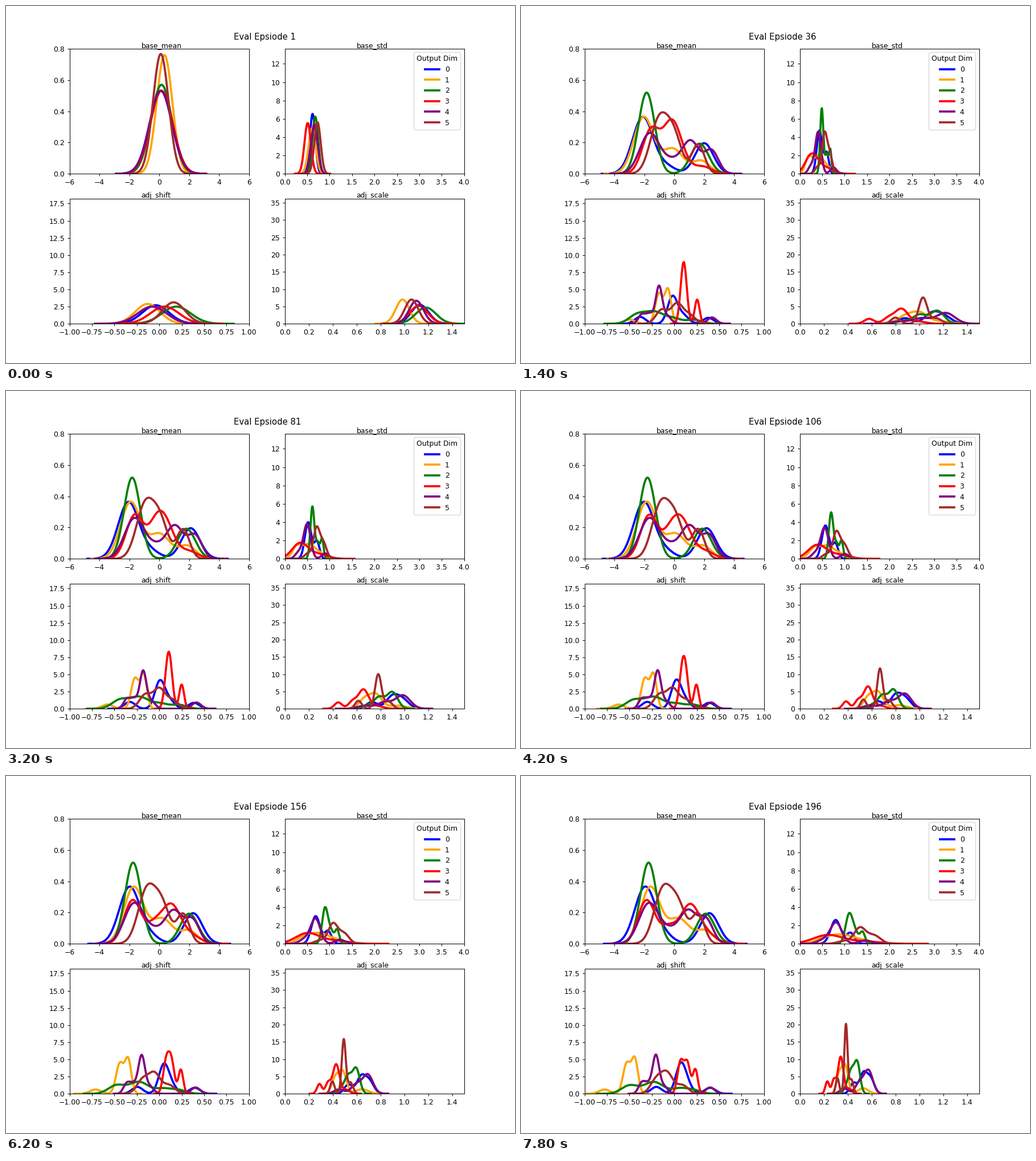
Write a matplotlib script that moves like this. It is 894 by 626 pixels and loops after 8000 ms.

```python
import numpy as np
import matplotlib.pyplot as plt
from matplotlib.animation import FuncAnimation

W, H, DPI = 894, 626, 89.4
FRAMES, INTERVAL = 40, 200
OPEN = 7      # frames in which the first single hump splits up
REACH = 4     # widths drawn on either side of a hump
COLORS = ["blue", "orange", "green", "red", "purple", "brown"]

plt.rcParams["font.family"] = "DejaVu Sans"
fig = plt.figure(figsize=((W + .01) / DPI, (H + .01) / DPI), dpi=DPI)
curves = []


class Hump:
    """One Gaussian: leaves the start hump, then drifts from a to b.

    With ratio set it drifts geometrically and its width follows its centre.
    """

    def __init__(self, start, ratio, a, b, width, weight):
        self.start, self.ratio = start, ratio
        self.a, self.b, self.width, self.weight = a, b, width, weight

    def place(self, t):
        if t < OPEN:
            u = t / OPEN
            c0, s0 = self.start
            s1 = self.width * (self.a if self.ratio else 1)
            return c0 + (self.a - c0) * u, s0 * (s1 / s0) ** u
        u = (t - OPEN) / (FRAMES - 1 - OPEN)
        if self.ratio:
            c = self.a * (self.b / self.a) ** u
            return c, self.width * c
        return self.a + (self.b - self.a) * u, self.width


def panel(pos, name, name_x, xlim, top, xstep, ystep):
    ax = fig.add_subplot(2, 2, pos)
    ax.set(xlim=xlim, ylim=(0, top))
    ax.set_xticks(np.arange(xlim[0], xlim[1] + 1e-9, xstep))
    ax.set_yticks(np.arange(0, top + 1e-9, ystep))
    ax.text(name_x, top * 1.0115, name)
    ax.set_prop_cycle(color=COLORS)
    return ax


def curve(ax, start, *humps, ratio=False):
    """start: centre and width; humps: from, to, width, weight."""
    line, = ax.plot([], [], lw=3, label=str(len(ax.lines)))
    curves.append((line, [Hump(start, ratio, *h) for h in humps]))


def density(humps, t):
    spots = [h.place(t) for h in humps]
    total = sum(h.weight for h in humps)
    x = np.linspace(min(c - REACH * s for c, s in spots),
                    max(c + REACH * s for c, s in spots), 500)
    y = sum(h.weight / s * np.exp(-((x - c) / s) ** 2 / 2)
            for h, (c, s) in zip(humps, spots))
    return x, y / (total * np.sqrt(2 * np.pi))


mean = panel(1, "base_mean", -1.2, (-6, 6), .8, 2, .2)
std = panel(2, "base_std", 1.6, (0, 4), 13.64, .5, 2)
shift = panel(3, "adj_shift", -.2, (-1, 1), 18.2, .25, 2.5)
scale = panel(4, "adj_scale", .6, (0, 1.5), 36.15, .2, 5)
title = mean.text(5, .86, "", fontsize=12)

curve(mean, (.1, .75), (-2.1, -1.95, .69, .66), (-.5, -.6, .6, .07),
      (2, 2.35, .62, .32))
curve(mean, (.35, .525), (-2.05, -1.6, .66, .6), (-.1, .3, .7, .28),
      (1.8, 2.05, .58, .12))
curve(mean, (.15, .7), (-1.85, -1.72, .545, .71), (1.7, 2.1, .6, .29))
curve(mean, (.15, .75), (-1.55, -1.85, .58, .41), (-.3, -.4, .5, .12),
      (0, 1.05, .65, .41), (1.9, 2.3, .6, .07))
curve(mean, (.1, .75), (-1.65, -1.7, .66, .41), (-.2, -.3, .6, .1),
      (1.1, .95, .58, .29), (2.5, 2.15, .46, .16))
curve(mean, (.1, .52), (-1, -.75, .6, .5), (0, .3, .52, .27),
      (1.6, 1.6, .42, .19))

curve(std, (.62, .061), (.44, .8, .14, .73), (.6, 1.13, .08, .27), ratio=True)
curve(std, (.61, .08), (.2, .6, .38, .35), (.42, 1, .24, .5),
      (.62, 1.45, .14, .15), ratio=True)
curve(std, (.68, .064), (.49, 1.1, .072, .65), (.6, 1.24, .06, .2),
      (.68, 1.4, .04, .18), ratio=True)
curve(std, (.51, .072), (.27, .62, .52, .76), (.6, 1.4, .26, .24), ratio=True)
curve(std, (.66, .074), (.41, .81, .16, .75), (.25, .52, .25, .13),
      (.75, 1.46, .09, .12), ratio=True)
curve(std, (.73, .071), (.55, 1.34, .095, .55), (.66, 1.65, .09, .35),
      (.4, 1, .15, .12), ratio=True)

curve(shift, (-.04, .148), (-.02, .07, .055, .54), (-.38, -.2, .06, .15),
      (.1, .14, .06, .18), (.38, .4, .06, .13))
curve(shift, (-.13, .138), (-.17, -.53, .042, .45), (-.07, -.44, .036, .43),
      (-.5, -.78, .06, .09))
curve(shift, (.19, .16), (-.42, -.5, .09, .27), (-.22, -.23, .11, .48),
      (0, .05, .08, .13), (.22, .2, .09, .13))
curve(shift, (.06, .16), (.1, .07, .034, .4), (.11, .145, .033, .37),
      (.255, .235, .027, .24))
curve(shift, (-.08, .16), (-.17, -.205, .036, .5), (-.28, -.3, .05, .2),
      (-.37, -.37, .035, .1), (-.08, -.12, .045, .13), (.42, .4, .05, .12))
curve(shift, (.16, .128), (-.14, -.2, .065, .33), (.03, -.08, .065, .47),
      (.17, .09, .065, .2))

curve(scale, (1.13, .073), (.88, .45, .065, .23), (1.1, .53, .055, .4),
      (1.2, .59, .055, .37), ratio=True)
curve(scale, (.985, .057), (.88, .33, .07, .33), (1, .38, .065, .5),
      (1.17, .53, .08, .17), ratio=True)
curve(scale, (1.18, .085), (.86, .39, .06, .1), (1, .43, .055, .36),
      (1.15, .48, .05, .54), ratio=True)
curve(scale, (1.12, .077), (.58, .23, .07, .15), (.74, .285, .06, .18),
      (.85, .342, .065, .62), (1, .41, .06, .09), ratio=True)
curve(scale, (1.1, .06), (.84, .37, .09, .13), (1.02, .5, .07, .28),
      (1.22, .575, .062, .6), ratio=True)
curve(scale, (1.06, .057), (.8, .315, .045, .16), (1.03, .386, .034, .66),
      (1.14, .43, .04, .18), ratio=True)

std.legend(title="Output Dim", loc="upper right", labelspacing=.46)


def update(i):
    title.set_text(f"Eval Epsiode {1 + 5 * i}")
    for line, humps in curves:
        line.set_data(*density(humps, i))
    return [title] + [line for line, _ in curves]


anim = FuncAnimation(fig, update, frames=FRAMES, interval=INTERVAL,
                     repeat=True, repeat_delay=0)
plt.show()
```
